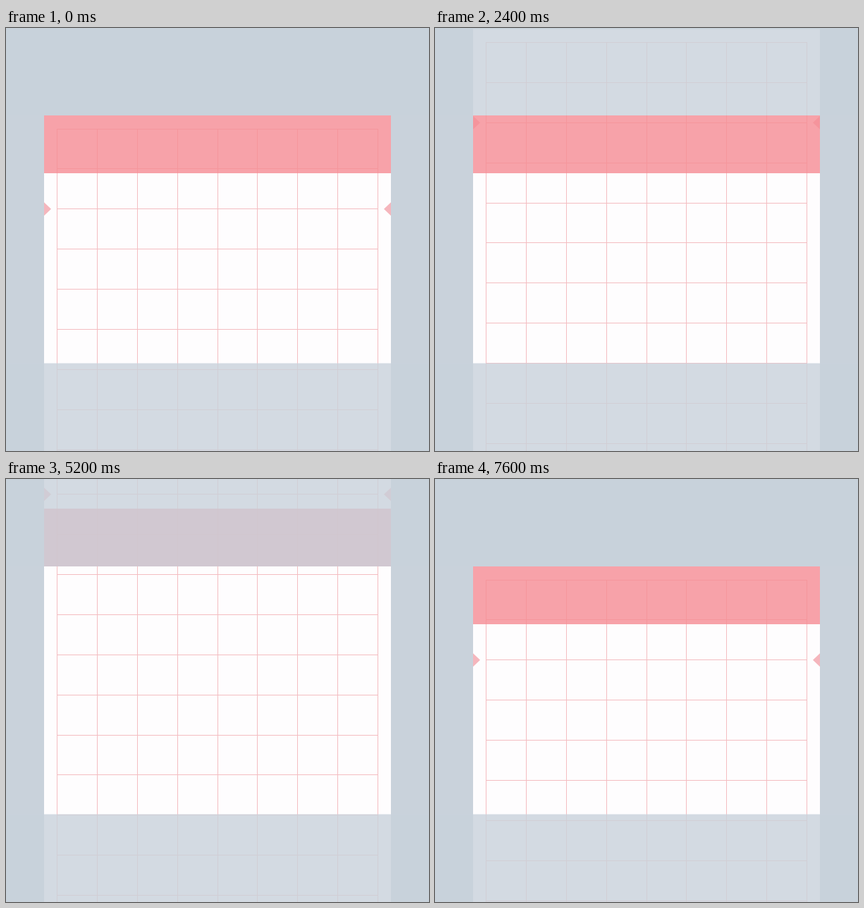
These frames come from a looping animation (600 by 600 pixels, 8000 ms). An HTML page with a canvas:

```html
<!DOCTYPE html>
<html lang="en">
<head>
<meta charset="utf-8">
<title>Scrolling header</title>
<style>
html, body { margin: 0; height: 100%; overflow: hidden; background: #c9d2db; }
canvas { display: block; width: 100vw; height: 100vh; }
</style>
</head>
<body>
<canvas id="stage" width="600" height="600"></canvas>
<script>
const ctx = document.getElementById('stage').getContext('2d');
const LOOP = 8000, STEP = 100;
const LEFT = 54, RIGHT = 546, TOP = 124, BOTTOM = 475.5;
const HEADER = 82, GRID_X = 72.5, GRID_Y = 143, CELL = 56.875, COLS = 8;
const MARK_Y = GRID_Y + 2 * CELL;

// Scroll offset over time: [ms, px]
const keys = [
  [0, 0], [900, 151], [1550, 262], [2400, 122.5], [2700, 36], [2900, 5], [3000, 0],
  [3100, 0], [3700, 250], [4300, 306], [4700, 293.5], [5900, 118.5],
  [6700, 22], [7600, 0], [LOOP, 0]
];

const slope = i => (keys[i + 1][1] - keys[i][1]) / (keys[i + 1][0] - keys[i][0]);

// Flat at turning points, harmonic mean elsewhere
function tangent(i) {
  if (i === 0 || i === keys.length - 1) return 0;
  const a = slope(i - 1), b = slope(i);
  return a * b > 0 ? 2 * a * b / (a + b) : 0;
}

function scrollAt(t) {
  let i = 0;
  while (i < keys.length - 2 && t >= keys[i + 1][0]) i++;
  const [t0, y0] = keys[i], [t1, y1] = keys[i + 1];
  const d = t1 - t0, u = (t - t0) / d, v = 1 - u;
  return y0 * v * v * (1 + 2 * u) + y1 * u * u * (3 - 2 * u)
    + d * u * v * (tangent(i) * v - tangent(i + 1) * u);
}

function rect(color, x, y, w, h) {
  ctx.fillStyle = color;
  ctx.fillRect(x, y, w, h);
}

function marker(x, y, dir) {
  ctx.beginPath();
  ctx.moveTo(x, y - 9.5);
  ctx.lineTo(x + 10 * dir, y);
  ctx.lineTo(x, y + 9.5);
  ctx.fill();
}

function grid(y) {
  const line = '#f4bdc1';
  for (let i = 0; i <= COLS; i++) {
    rect(line, Math.floor(GRID_X + i * CELL), Math.floor(y), 1, 1200);
  }
  for (let ly = y; ly < 600; ly += CELL) {
    rect(line, 72, Math.floor(ly), 456, 1);
  }
}

function draw(t) {
  const s = scrollAt(t);
  const mark = MARK_Y - s;
  const shift = Math.max(-HEADER, Math.min(0, mark - TOP));

  rect('#c9d2db', 0, 0, 600, 600);
  rect('#fefdfe', LEFT, TOP - s, RIGHT - LEFT, 1200);
  grid(GRID_Y - s);
  ctx.fillStyle = '#f5b6bd';
  marker(LEFT, mark, 1);
  marker(RIGHT, mark, -1);
  rect('rgba(245,140,148,0.8)', LEFT, Math.round(TOP + shift), RIGHT - LEFT, HEADER);

  // Dim everything outside the viewport
  const veil = 'rgba(201,210,219,0.8)';
  rect(veil, 0, 0, 600, TOP);
  rect(veil, 0, BOTTOM, 600, 600 - BOTTOM);
}

const start = performance.now();
function frame() {
  const t = (performance.now() - start) % LOOP;
  draw(Math.floor(t / STEP) * STEP);
  requestAnimationFrame(frame);
}
frame();
</script>
</body>
</html>
```
